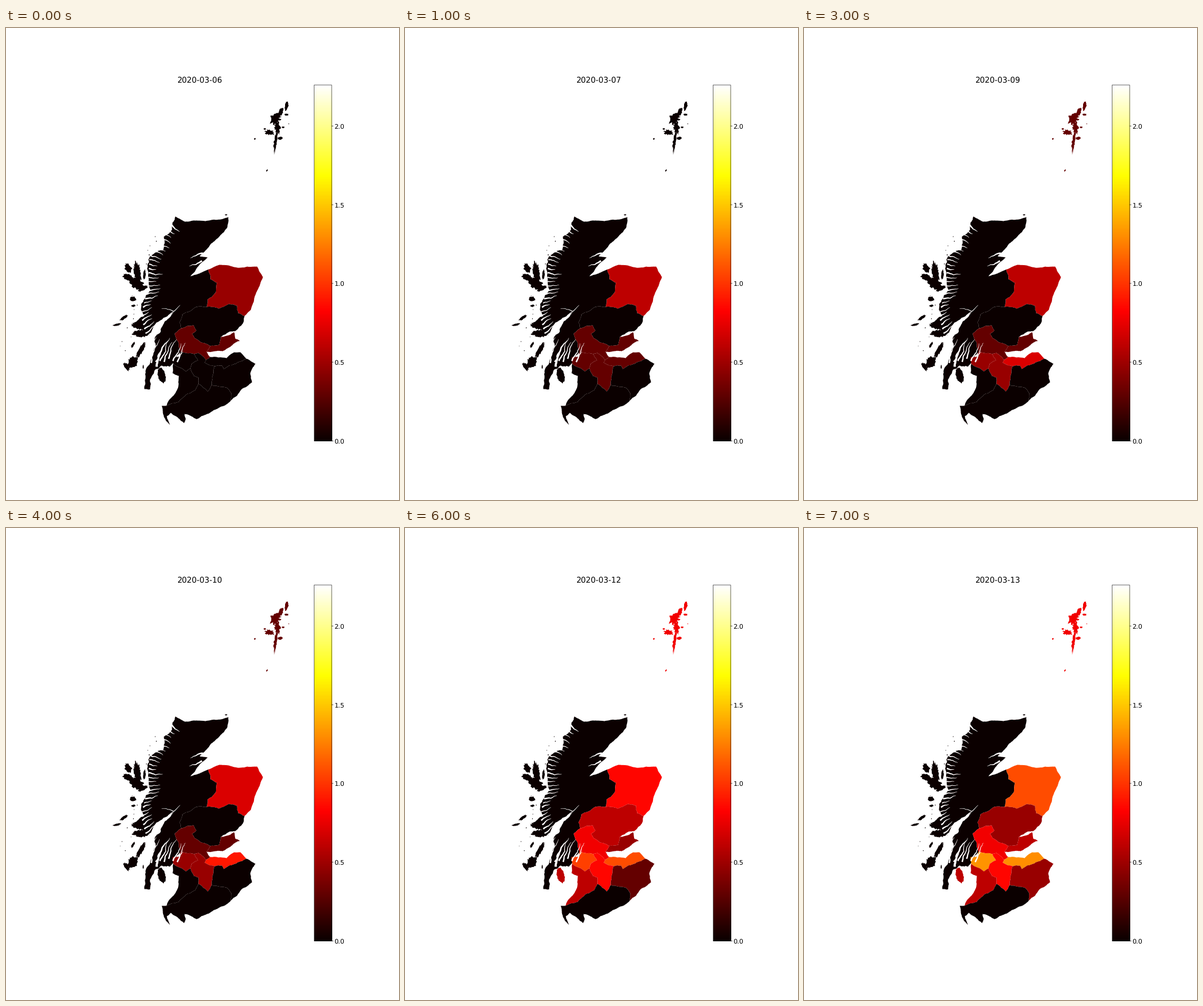
A matplotlib script that plays this animation: 683 px wide and 820 px high, repeating every 8000 ms.

```python
import math

import matplotlib.pyplot as plt
import numpy as np
from matplotlib.animation import FuncAnimation

W, H, DPI = 683, 820, 64
VMAX = math.log10(182)
HOT = plt.get_cmap("hot")
rng = np.random.default_rng(11)

plt.rcParams["text.hinting"] = "none"
plt.rcParams["font.family"] = "DejaVu Sans"
fig = plt.figure(figsize=(W / DPI, H / DPI), dpi=DPI, facecolor="white")
ax = fig.add_axes([0, 0, 1, 1])
ax.set_axis_off()


def pt(px):
    return px * 72 / DPI


def edge(*xy, rough=0.08):
    """Fractal line: midpoints are pushed sideways until steps are short."""
    pts = np.array(xy, float).reshape(-1, 2) + 0.5
    while True:
        d = np.diff(pts, axis=0)
        if np.hypot(*d.T).max() < 4:
            return pts
        push = rng.uniform(-rough, rough, (len(d), 1))
        mid = pts[:-1] + d / 2 + d[:, ::-1] * [-1, 1] * push
        pts = np.insert(pts, np.arange(1, len(pts)), mid, axis=0)


def blob(x, y, length, width, lean=0, rough=0.22):
    """Ragged ellipse; lean is the slant of its long axis in degrees."""
    n = max(8, int(length * 1.6))
    t = np.linspace(0, 2 * math.pi, n, endpoint=False)
    r = 1 + rng.uniform(-rough, rough, n)
    u, v = r * np.cos(t) * length / 2, r * np.sin(t) * width / 2
    c, s = math.cos(math.radians(lean)), math.sin(math.radians(lean))
    return np.c_[x + 0.5 + u * c - v * s, y + 0.5 + u * s + v * c]


def loch(width, *xy):
    """White inlet that narrows from its mouth to its head."""
    line = edge(*xy, rough=0.1)
    t = np.gradient(line, axis=0)
    normal = np.c_[-t[:, 1], t[:, 0]] / np.hypot(*t.T)[:, None]
    half = np.linspace(width, 0.5, len(line))[:, None] / 2
    outline = np.vstack([line + normal * half, (line - normal * half)[::-1]])
    ax.fill(*outline.T, color="white", lw=0, zorder=3)


def ring(*lines):
    return np.vstack(lines)


# Borders shared by two regions
high_gram = edge(351, 419, 355, 436, 366, 442, 364, 459, 350, 471, 348, 484)
gram_tay = edge(348, 484, 369, 487, 387, 479, 401, 482, 403, 495, 414, 500)
high_tay = edge(348, 484, 330, 484, 306, 497, 301, 511, 304, 521)
tay_forth = edge(304, 521, 325, 516, 330, 525, 323, 531, 327, 538, 354, 552)
high_forth = edge(304, 521, 293, 530, 299, 545, 303, 562)
tay_fife = edge(354, 552, 370, 550, 373, 536)
fife_forth = edge(354, 552, 348, 562)
forth_loth = edge(354, 571, 347, 576)
forth_lan = edge(347, 576, 334, 564, 327, 566)
forth_glas = edge(327, 566, 312, 564, 303, 562)
glas_lan = edge(327, 566, 333, 577, 322, 583, 320, 591)
glas_ayr = edge(290, 583, 312, 596, 320, 591)
loth_lan = edge(347, 576, 345, 581, 362, 587)
loth_bord = edge(417, 574, 387, 586, 378, 592, 375, 586, 362, 587)
lan_bord = edge(362, 587, 358, 611, 357, 620)
ayr_lan = edge(320, 591, 326, 604, 334, 607, 334, 618)
lan_dum = edge(334, 618, 350, 631, 357, 620)
dum_bord = edge(357, 620, 382, 624, 391, 634, 390, 647)
ayr_dum = edge(278, 656, 300, 649, 312, 637, 328, 629, 334, 618)

# Coasts
gram_coast = edge(351, 419, 370, 411, 402, 416, 436, 414, 446, 432, 433, 463,
                  425, 489, 414, 500, rough=0.05)
tay_coast = edge(414, 500, 411, 513, 398, 526, 388, 527, 373, 536)
fife_coast = edge(373, 536, 396, 528, 398, 539, 406, 543, 376, 561, 348, 562)
forth_coast = edge(348, 562, 354, 571)
loth_coast = edge(354, 571, 383, 573, 396, 563, 407, 563, 417, 574, rough=0.06)
bord_coast = edge(417, 574, 433, 583, 424, 600, 427, 615, 409, 627, 390, 647)
dum_coast = edge(390, 647, 378, 656, 349, 670, 331, 679, 310, 670, 312, 679,
                 309, 686, 286, 668, 279, 674, 284, 689, 274, 675, 270, 656,
                 278, 656)
ayr_coast = edge(278, 656, 299, 622, 300, 604, 289, 599, 290, 583)
glas_coast = edge(303, 562, 301, 570, 289, 571, 290, 583)
north_coast = edge(294, 327, 311, 336, 346, 335, 386, 328, 384, 346, 356, 374,
                   336, 396, 350, 398, 320, 431, 351, 419, rough=0.06)
west_coast = edge(303, 562, 294, 575, 286, 586, 270, 586, 258, 594, 250, 627,
                  240, 627, 247, 586, 258, 538, 272, 516, 291, 492, 250, 530,
                  222, 511, 240, 500, 234, 489, 250, 455, 247, 440, 250, 395,
                  272, 386, 274, 362, 288, 350, 294, 327, rough=0.13)

isles = [
    blob(228, 425, 38, 11, 82), blob(212, 417, 17, 11, 60),
    blob(212, 433, 20, 10, 20), blob(227, 444, 26, 17, 30),
    blob(238, 452, 18, 6, -30), blob(240, 428, 18, 4, 95),
    blob(220, 470, 11, 8), blob(221, 482, 7, 4),
    blob(204, 503, 16, 5, -35), blob(192, 515, 13, 4, -15),
    blob(230, 518, 24, 9, 15), blob(236, 530, 30, 13, -5),
    blob(220, 550, 10, 4, -60), blob(234, 559, 29, 8, -60),
    blob(220, 580, 20, 17, -60), blob(209, 588, 15, 7, 60),
    blob(238, 588, 7, 2, 90), blob(282, 582, 12, 6, 60),
    blob(382, 324, 4, 2),
]
shetland = [
    blob(487, 135, 16, 6, 100), blob(477, 145, 15, 7, 110),
    blob(487, 150, 7, 4), blob(467, 157, 20, 16, -45, 0.35),
    blob(471, 172, 24, 9, 80, 0.4), blob(457, 181, 17, 9, 10, 0.35),
    blob(468, 197, 38, 5, 97, 0.35), blob(476, 191, 9, 5),
    blob(481, 172, 5, 3), blob(449, 175, 4, 3), blob(432, 192, 3, 3),
    blob(453, 247, 4, 2, -60), blob(491, 166, 2, 1),
]

regions = {
    "highland": [ring(north_coast, high_gram, high_tay, high_forth,
                      west_coast)] + isles,
    "shetland": shetland,
    "grampian": [ring(gram_coast, gram_tay[::-1], high_gram[::-1])],
    "tayside": [ring(gram_tay, tay_coast, tay_fife[::-1], tay_forth[::-1],
                     high_tay[::-1])],
    "fife": [ring(tay_fife, fife_coast, fife_forth[::-1])],
    "forth": [ring(tay_forth, fife_forth, forth_coast, forth_loth, forth_lan,
                   forth_glas, high_forth[::-1])],
    "glasgow": [ring(forth_glas, glas_coast, glas_ayr, glas_lan[::-1])],
    "lothian": [ring(loth_coast, loth_bord, loth_lan[::-1], forth_loth[::-1])],
    "lanark": [ring(forth_lan, glas_lan, ayr_lan, lan_dum, lan_bord[::-1],
                    loth_lan[::-1])],
    "borders": [ring(bord_coast, dum_bord[::-1], lan_bord[::-1],
                     loth_bord[::-1])],
    "ayrshire": [ring(ayr_coast, glas_ayr, ayr_lan, ayr_dum[::-1]),
                 blob(270, 603, 26, 13, 75, 0.1)],
    "dumfries": [ring(dum_bord, dum_coast, ayr_dum, lan_dum)],
}

# Case total from the given day on; every region starts at zero
cases = {
    "grampian": {0: 2, 1: 3, 4: 4, 5: 5, 6: 6, 7: 11},
    "fife": {0: 1, 6: 2, 7: 3},
    "forth": {0: 1, 6: 5},
    "tayside": {5: 1, 6: 3, 7: 2},
    "glasgow": {1: 1, 2: 2, 5: 4, 6: 10, 7: 20},
    "lanark": {1: 1, 3: 2, 5: 3, 6: 6},
    "lothian": {1: 1, 2: 2, 3: 4, 4: 7, 5: 8, 6: 11, 7: 19},
    "ayrshire": {5: 2, 6: 3},
    "borders": {5: 1, 7: 2},
    "shetland": {3: 1, 6: 5},
}

patches = {name: [ax.fill(*p.T, color=HOT(0), lw=0)[0] for p in parts]
           for name, parts in regions.items()}

# Large sea lochs and firths
loch(6, 246, 543, 265, 519, 291, 492)
loch(1.2, 291, 492, 302, 481)
loch(1.2, 291, 492, 270, 487)
loch(4, 261, 588, 272, 553, 284, 538)
loch(3, 342, 391, 320, 399)
loch(3, 340, 404, 318, 413)

# Small inlets: they run south-east in the north and north-east in the south
for y in np.linspace(342, 560, 30):
    x = np.interp(y, [342, 362, 395, 450, 500, 560],
                  [288, 272, 249, 246, 234, 250])
    turn = math.radians(np.interp(y, [342, 440, 560], [40, 0, -55]))
    size = rng.uniform(12, 25)
    loch(rng.uniform(1.5, 3.2), x, y,
         x + size * math.cos(turn), y + size * math.sin(turn))
for x in np.linspace(252, 297, 7):
    loch(2.6, x, 582 - rng.uniform(0, 8), x + 14, 552 - rng.uniform(0, 12))

# Skerries off the west coast
for y in np.linspace(362, 560, 26):
    x = np.interp(y, [362, 400, 450, 560], [266, 244, 232, 210])
    skerry = blob(x + rng.uniform(-14, 6), y, *rng.uniform(0.8, 2, 2))
    ax.fill(*skerry.T, color=HOT(0), lw=0)

# Colour bar
LEFT, RIGHT, TOP, BOTTOM = 535.5, 566, 99, 717.5
ax.imshow(np.linspace(1, 0, 256)[:, None], cmap=HOT, aspect="auto",
          extent=(LEFT, RIGHT, BOTTOM + 0.5, TOP), interpolation="nearest")
ax.add_patch(plt.Rectangle((LEFT, TOP), RIGHT - LEFT, BOTTOM - TOP, fill=False,
                           lw=pt(0.6), snap=False, zorder=4))
for value in np.arange(0, 2.1, 0.5):
    y = BOTTOM - (BOTTOM - TOP) * value / VMAX
    ax.plot([RIGHT, RIGHT + 2.8], [y, y], color="black", lw=pt(0.6), snap=False)
    ax.text(570.5, y + 4.4, f"{value:.1f}", fontsize=pt(11.25))

title = ax.text(335.8, 95.2, "", fontsize=pt(13.5), ha="center")
ax.set_xlim(0, W)
ax.set_ylim(H, 0)


def total(steps, day):
    return next((steps[d] for d in range(day, -1, -1) if d in steps), 0)


def draw(day):
    title.set_text(f"2020-03-{6 + day:02d}")
    for name, steps in cases.items():
        color = HOT(math.log10(total(steps, day) + 1) / VMAX)
        for patch in patches[name]:
            patch.set_facecolor(color)
    return []


for patch in sum(patches.values(), []):
    patch.set_edgecolor("none")
anim = FuncAnimation(fig, draw, frames=8, interval=1000, repeat=True,
                     repeat_delay=0)
plt.show()
```
